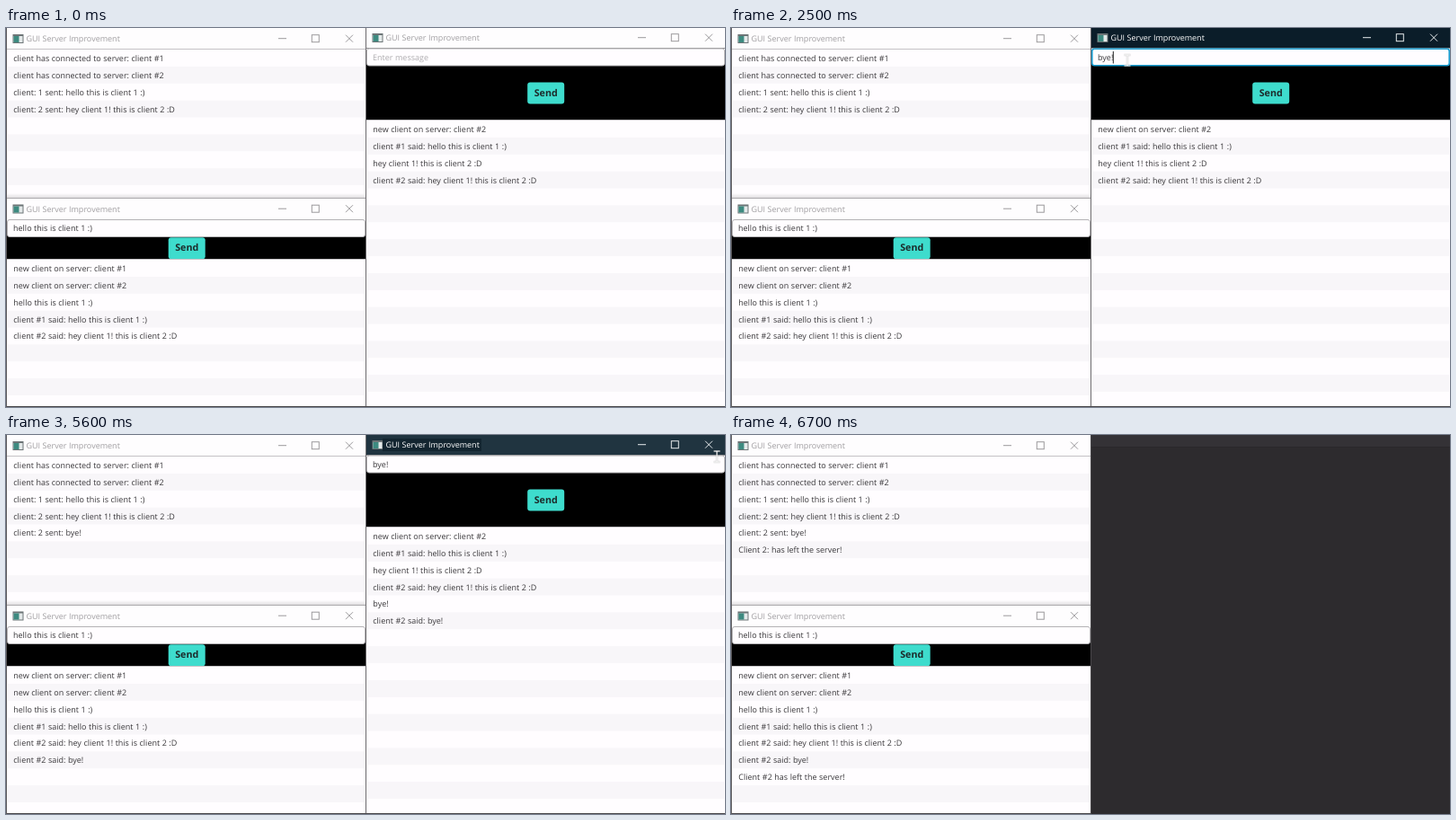
An HTML page with a canvas that plays this animation: 800x422 px, repeating every 7200 ms.

```html
<!DOCTYPE html>
<html lang="en">
<head>
<meta charset="utf-8">
<title>GUI Server Improvement</title>
<style>
html, body { margin: 0; width: 100%; height: 100%; overflow: hidden; background: #2d2b2e; }
canvas { display: block; width: 800px; height: 422px; }
</style>
</head>
<body>
<canvas id="stage" width="800" height="422"></canvas>
<script>
const ctx = document.getElementById('stage').getContext('2d');
const LOOP = 7200, STEP = 100, ROW = 18.88, WIDTH = 399;
const FONT = '"Open Sans", "Noto Sans", sans-serif';
const DESK = '#2d2b2e';

// Times of the events
const FOCUS = 1000, SEND = 4100, HOVER = 4900, CLOSE = 5600, LEFT = 5700, GONE = 5900;
const TYPED = [[1600, 'b'], [1700, 'by'], [2000, 'bye'], [2500, 'bye!']];

// Pointer path: time, x, y
const PATH = [
  [500, 600, 421], [1000, 441, 36], [2700, 441, 36], [3100, 520, 56],
  [3300, 524, 58], [3900, 604, 74], [4100, 606, 74], [4400, 683, 51],
  [4800, 765, 20], [5000, 782, 11], [5500, 782, 11], [5600, 791, 24],
  [5700, 769, 71], [6000, 727, 150], [6300, 655, 265], [6500, 655, 265],
  [6600, 575, 370]
];

function rect(x, y, w, h, color) {
  ctx.fillStyle = color;
  ctx.fillRect(x, y, w, h);
}

function round(x, y, w, h, r, fill, stroke, width = 1) {
  ctx.beginPath();
  ctx.roundRect(x, y, w, h, r);
  ctx.fillStyle = fill;
  ctx.fill();
  if (stroke) {
    ctx.strokeStyle = stroke;
    ctx.lineWidth = width;
    ctx.stroke();
  }
}

function line(points, color, width = 1) {
  ctx.beginPath();
  for (const [x, y] of points) ctx.lineTo(x, y);
  ctx.strokeStyle = color;
  ctx.lineWidth = width;
  ctx.stroke();
}

// Text centred vertically on y
function label(str, x, y, color = '#3a383b', font = '9px') {
  ctx.font = `${font} ${FONT}`;
  ctx.fillStyle = color;
  ctx.fillText(str, x, y + 3.3);
}

function icon(x, y) {
  rect(x, y, 12, 10, '#6d7577');
  rect(x + 1, y + 2, 10, 7, '#e4eaea');
  rect(x + 1, y + 2, 6, 7, '#3d8a80');
}

function titleBar(x, y, h, active, bg, hot) {
  const mid = y + h / 2, ink = active ? '#ffffff' : '#a09ea1';
  rect(x, y, WIDTH, h, bg);
  if (hot) rect(x + 362, y, 37, h, '#e81123');
  icon(x + 6.5, mid - 5);
  label('GUI Server Improvement', x + 21.4, mid - 0.2, ink);
  const c = active ? '#e6eaec' : '#9b999c', cy = mid - 0.3;
  line([[x + 302, cy], [x + 311, cy]], c);
  ctx.strokeRect(x + 339.3, cy - 4, 8, 8);
  line([[x + 377, cy - 4], [x + 385, cy + 4]], c);
  line([[x + 377, cy + 4], [x + 385, cy - 4]], c);
}

function list(x, y, bottom, items) {
  rect(x, y, WIDTH, bottom - y, '#fffdff');
  ctx.save();
  ctx.beginPath();
  ctx.rect(x, y, WIDTH, bottom - y);
  ctx.clip();
  for (let i = 1, top = y + 1 + ROW; top < bottom; i += 2, top += 2 * ROW) {
    rect(x + 1, top, WIDTH - 2, ROW, '#f8f6f9');
  }
  items.forEach((s, i) => label(s, x + 7.3, y + 10.6 + i * ROW));
  ctx.restore();
  line([[x, y + 0.5], [x + WIDTH, y + 0.5]], '#c4c2c5');
}

// Black panel with the message field on its top edge
function panel(x, y, bottom, str, focused, prompt) {
  rect(x, y, WIDTH, 3, '#fefdfe');
  rect(x, y + 3, WIDTH, bottom - y - 3, '#000');
  if (focused) {
    round(x + 0.8, y + 0.8, WIDTH - 1.6, 18.4, 2.5, '#fffdff', '#1b9fd2', 1.6);
  } else {
    round(x + 0.5, y + 0.5, WIDTH - 1, 19, 2.5, '#fffdff', '#b4b2b5');
  }
  label(str || prompt, x + 7, y + 10, str ? '#3a383b' : '#aeacaf');
}

function button(x, y) {
  round(x, y, 41, 24, 3, '#3edccd');
  label('Send', x + 7.5, y + 11.8, '#1c2b2b', 'bold 10.7px');
}

function serverWindow(t) {
  const log = [
    'client has connected to server: client #1',
    'client has connected to server: client #2',
    'client: 1 sent: hello this is client 1 :)',
    'client: 2 sent: hey client 1! this is client 2 :D'
  ];
  if (t >= SEND) log.push('client: 2 sent: bye!');
  if (t >= LEFT) log.push('Client 2: has left the server!');
  titleBar(1, 0, 24, false, '#fefdfe');
  list(1, 23, 190, log);
  const shade = ctx.createLinearGradient(0, 184, 0, 190);
  shade.addColorStop(0, 'rgba(0,0,0,0)');
  shade.addColorStop(1, 'rgba(0,0,0,0.14)');
  rect(1, 184, WIDTH, 6, shade);
}

function firstClient(t) {
  const log = [
    'new client on server: client #1',
    'new client on server: client #2',
    'hello this is client 1 :)',
    'client #1 said: hello this is client 1 :)',
    'client #2 said: hey client 1! this is client 2 :D'
  ];
  if (t >= SEND) log.push('client #2 said: bye!');
  if (t >= LEFT) log.push('Client #2 has left the server!');
  titleBar(1, 190, 23, false, '#fefdfe');
  panel(1, 213, 257, 'hello this is client 1 :)', false, '');
  button(180.7, 233.3);
  list(1, 257, 421, log);
  line([[1, 189.5], [400, 189.5]], '#aba9ac');
}

function secondClient(t) {
  const log = [
    'new client on server: client #2',
    'client #1 said: hello this is client 1 :)',
    'hey client 1! this is client 2 :D',
    'client #2 said: hey client 1! this is client 2 :D'
  ];
  if (t >= SEND) log.push('bye!', 'client #2 said: bye!');
  const active = t >= FOCUS, focused = active && t < SEND - 100;
  const closing = t >= CLOSE;
  let str = '';
  for (const [at, s] of TYPED) if (t >= at) str = s;

  const bar = closing ? '#203440' : active ? '#0b1d29' : '#fefdfe';
  titleBar(401, 0, 22, active, bar, t >= HOVER && t < CLOSE);
  if (closing) {
    rect(419, 4, 110, 14, '#132530');
    label('GUI Server Improvement', 422.4, 10.8, '#fff');
  }
  panel(401, 22.5, 103, str, focused, active ? '' : 'Enter message');
  if (focused && str) {
    ctx.font = `9px ${FONT}`;
    const x = 408 + ctx.measureText(str).width;
    line([[x, 26], [x, 39.5]], '#222');
  }
  button(580.2, 60.6);
  list(401, 102, 421, log);
}

function beam(x, y) {
  const bars = [
    [[x, y - 6], [x, y + 6]],
    [[x - 3.5, y - 6], [x + 3.5, y - 6]],
    [[x - 3.5, y + 6], [x + 3.5, y + 6]]
  ];
  for (const b of bars) line(b, 'rgba(60,60,60,0.25)', 2.4);
  for (const b of bars) line(b, '#fff', 1.2);
}

function arrow(x, y) {
  const tip = [[0, 0], [0, 12], [2.8, 9.5], [4.7, 13.5], [6.6, 12.6], [4.8, 8.8], [8.3, 8.6]];
  ctx.beginPath();
  for (const [dx, dy] of tip) ctx.lineTo(x + dx, y + dy);
  ctx.closePath();
  ctx.fillStyle = '#fff';
  ctx.strokeStyle = 'rgba(0,0,0,0.45)';
  ctx.lineWidth = 0.8;
  ctx.fill();
  ctx.stroke();
}

function pointer(t) {
  const i = PATH.findIndex(p => p[0] >= t);
  if (i < 0 || t < PATH[0][0]) return;
  const b = PATH[i], a = PATH[Math.max(0, i - 1)];
  const k = b[0] > a[0] ? (t - a[0]) / (b[0] - a[0]) : 1;
  const x = a[1] + (b[1] - a[1]) * k, y = a[2] + (b[2] - a[2]) * k;
  const overField = y > 22 && y < 43;
  (t >= CLOSE || overField ? beam : arrow)(x, y);
}

function desktop() {
  rect(0, 0, 800, 422, DESK);
  rect(401, 0, 399, 13, '#343236');
  rect(401, 13, 399, 1, '#29272b');
}

function draw(t) {
  desktop();
  if (t < LEFT) {
    secondClient(t);
  } else if (t < GONE) {
    // The closing window shrinks and fades into the desktop
    const n = (t - LEFT) / STEP, scale = 0.967 - 0.03 * n;
    ctx.save();
    ctx.translate(600.5, 211);
    ctx.scale(scale, scale);
    ctx.translate(-600.5, -211);
    secondClient(t);
    ctx.restore();
    ctx.globalAlpha = n ? 0.93 : 0.7;
    rect(401, 0, 399, 422, DESK);
    ctx.globalAlpha = 1;
  }
  serverWindow(t);
  firstClient(t);
  rect(400, 0, 1, 422, t < LEFT ? '#6b696c' : '#4a484b');
  rect(0, 421, t < LEFT ? 800 : 400, 1, '#4a484b');
  rect(0, 0, 1, 422, '#5c5a5d');
  pointer(t);
}

ctx.textRendering = 'geometricPrecision';
ctx.wordSpacing = '0.2px';

function tick(now) {
  draw(Math.floor((now % LOOP) / STEP) * STEP);
  requestAnimationFrame(tick);
}
draw(0);
requestAnimationFrame(tick);
</script>
</body>
</html>
```
